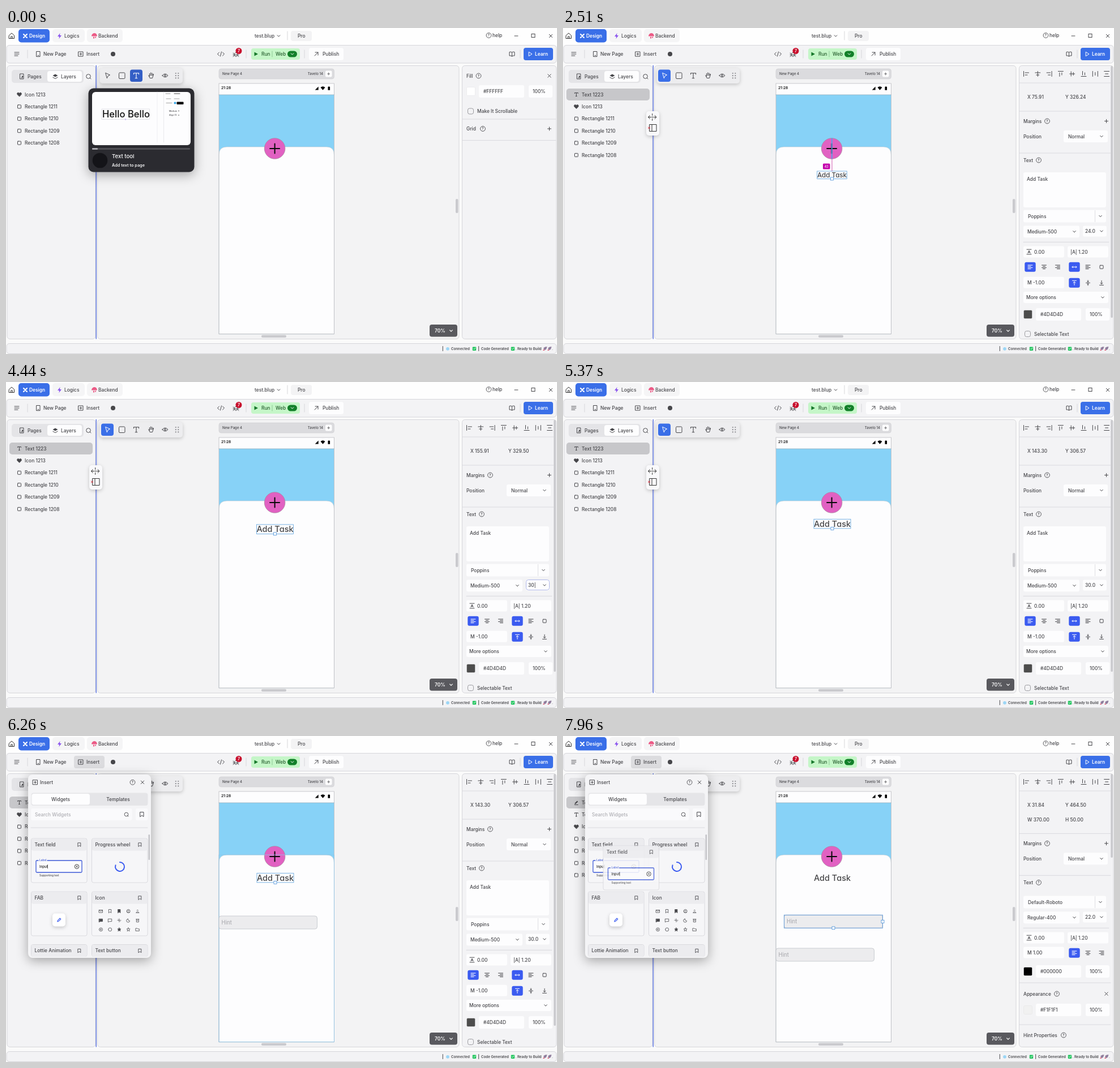
Write an HTML page that moves like this. It is 973 px wide and 576 px high and loops after 8 s.

```html
<!DOCTYPE html>
<html lang="en">
<head>
<meta charset="utf-8">
<title>App builder</title>
<style>
html, body { margin: 0; width: 100%; height: 100%; overflow: hidden; background: #fafafa; }
svg { display: block; width: 973px; height: 576px; }
text { font-family: Inter, "Open Sans", sans-serif; white-space: pre; }
.geo { font-feature-settings: "cv11"; }
.soft { filter: drop-shadow(0 2px 3px #0003); }
.deep { filter: drop-shadow(0 5px 10px #0005); }
</style>
</head>
<body>
<svg id="stage" viewBox="0 0 973 576"></svg>
<script>
const LOOP = 8000, INK = '#47474b', BLUE = '#3a6fe8', VIVID = '#3b5bf0', PANEL = '#f3f3f5', EDGE = '#cfcfd4';

// Drawing helpers: every one returns SVG markup.
const rect = (x, y, w, h, r = 0, fill = '#fdfdfe', stroke = 'none', sw = 1) =>
  `<rect x="${x}" y="${y}" width="${w}" height="${h}" rx="${r}" fill="${fill}" stroke="${stroke}" stroke-width="${sw}"/>`;
const disc = (x, y, r, fill = 'none', stroke = 'none', sw = 1) =>
  `<circle cx="${x}" cy="${y}" r="${r}" fill="${fill}" stroke="${stroke}" stroke-width="${sw}"/>`;
const text = (x, y, str, { s = 8.4, w = 500, c = INK, a = 'start', id = '', cls = '', f = '' } = {}) =>
  `<text x="${x}" y="${y + s * .36}" font-size="${s}" font-weight="${w}" fill="${c}" text-anchor="${a}"` +
  `${id && ` id="${id}"`}${cls && ` class="${cls}"`}${f && ` style="font-family:${f}"`}>${str}</text>`;
const icon = (x, y, d, stroke = INK, sw = 1, fill = 'none') =>
  `<path transform="translate(${x} ${y})" d="${d}" fill="${fill}" stroke="${stroke}" stroke-width="${sw}" stroke-linecap="round" stroke-linejoin="round"/>`;
const solid = (x, y, d, fill = INK) => icon(x, y, d, 'none', 0, fill);
const hline = (x1, x2, y, c = '#d6d6dc') => icon(0, y, `M${x1} 0H${x2}`, c, .9);
const vline = (x, y1, y2, c = '#d6d6da', sw = 1) => icon(x, 0, `M0 ${y1}V${y2}`, c, sw);
const group = (id, body, cls = '') => `<g id="${id}" class="${cls}">${body}</g>`;
const during = (spans, body, cls = '') => `<g data-on="${spans}" class="${cls}">${body}</g>`;

const D = {
  down: 'M-2.3-1.2L0 1.2L2.3-1.2', cross: 'M-2.7-2.7L2.7 2.7M2.7-2.7L-2.7 2.7', plus: 'M-3 0H3M0-3V3',
  box: 'M-2.2-3H2.2Q3-3 3-2.2V2.2Q3 3 2.2 3H-2.2Q-3 3-3 2.2V-2.2Q-3-3-2.2-3Z',
  left: 'M-4-3.3H4M-4-1.1H1M-4 1.1H4M-4 3.3H1', mid: 'M-4-3.3H4M-2-1.1H2M-4 1.1H4M-2 3.3H2',
  right: 'M-4-3.3H4M-1-1.1H4M-4 1.1H4M-1 3.3H4', heart: 'M0 3.3L-3.5 0C-5-3-1.5-4.5 0-2C1.5-4.5 5-3 3.5 0Z',
  tee: 'M-3-2V-3H3V-2M0-3V3M-1 3H1', mark: 'M-2.3-3.2H2.3V3.2L0 1.3L-2.3 3.2Z',
  arrow: 'M-3-4.5L4.5-1L1 .8L-.5 4.5Z', wide: 'M-4 0H4M-2.5-1.5L-4 0L-2.5 1.5M2.5-1.5L4 0L2.5 1.5',
  top: 'M-3.5-4H3.5M0 4V-2M-2 0L0-2L2 0', vmid: 'M-3.5 0H3.5M0-4.5V-1.5M0 4.5V1.5M-1.3-2.6L0-1.5L1.3-2.6M-1.3 2.6L0 1.5L1.3 2.6',
  bottom: 'M-3.5 4H3.5M0-4V2M-2 0L0 2L2 0', doc: 'M-3-4.5H3V4.5H-3ZM-1 2.5H1',
  pencil: 'M-3 3L-2.3 .8L1.5-3L3-1.5L-.8 2.3Z'
};
const help = (x, y) => disc(x, y, 4.4, 'none', INK, .9) + text(x, y, '?', { s: 6, w: 600, a: 'middle' });
const heading = (y, label, helpX) => text(813, y, label) + help(helpX, y);
const field = (x, y, w, h = 20) => rect(x, y - h / 2, w, h, 3);
const check = (y, label) => rect(815.5, y - 5, 10, 10, 3, 'none', '#85858a', .8) + text(832, y, label);
const selected = (x, y, d) => rect(x - 9.7, y - 8.5, 19.4, 17, 3, VIVID) + icon(x, y, d, '#fff', 1);
const knob = (x, y) => rect(x - 2.5, y - 2.5, 5, 5, 0, '#fff', '#4a90d8', .8);

function windowBar() {
  return rect(0, 0, 973, 30, 0, '#fefefe') +
    icon(10, 14, 'M-4.5-1L0-5L4.5-1V4.5H-4.5ZM-1.3 4.5V1H1.3V4.5', '#333') +
    rect(22, 2, 55, 23.5, 5, BLUE) + icon(34, 14, 'M-3-3L3 3M3-3L-3 3', '#fff', 2) + text(41, 13.7, 'Design', { w: 600, c: '#fff' }) +
    rect(82, 2, 57, 23, 5, '#f5f5f6') + solid(94.5, 14, 'M1-5L-3.5 1H-.5L-1 5L3.5-1H.5Z', '#8a54ee') + text(103, 13.7, 'Logics') +
    rect(143, 2, 63, 23, 5, '#f5f5f6') + solid(156, 13.5, 'M-5 1C-5-2-3-3-2-4C2-6 5-2 5 1ZM-2 2H0V5H-2ZM1 2H3V4H1Z', '#ec5a86') + text(163, 13.7, 'Backend') +
    text(439, 13.7, 'test.blup') + icon(481.5, 14, D.down) + vline(497, 6, 21) +
    rect(503, 5, 37, 18, 4, '#f3f3f4') + text(515, 13.7, 'Pro') +
    help(852.5, 13) + text(859, 13, 'help') +
    icon(901, 14, 'M-3 0H3') + rect(928, 10.5, 6, 6, 0, 'none', INK) + icon(962, 14, D.cross);
}

function toolbar() {
  return rect(1, 30.5, 971, 31.5, 5, PANEL, EDGE, .8) +
    icon(19, 46, 'M-4-3H4M-4 0H4M-4 3H2') + vline(38, 39, 53) +
    icon(57, 46, D.doc) + text(66, 46, 'New Page') +
    during('5600-8000', rect(120, 35, 54, 22, 4, '#dcdcdf')) +
    icon(132, 46, 'M-4-4H4V4H-4ZM-2 0H2M0-2V2') + text(142, 46, 'Insert') + disc(189, 46, 4, INK) +
    icon(379.5, 46, 'M-3-3L-6 0L-3 3M3-3L6 0L3 3M1-4L-1 4') +
    icon(406, 46.5, 'M-2.5-1Q0-5 2.5-1V2Q0 6-2.5 2ZM-5-2L-2.5-1M-5 4L-2.5 2M5 4L2.5 2M-5 1H5') +
    disc(411, 40.5, 5.5, '#c8102e') + text(411, 40.5, '7', { s: 7, w: 600, c: '#fff', a: 'middle' }) + vline(424, 39, 53) +
    rect(433, 36, 86, 20, 4, '#c5f6c8') + solid(441.5, 46, 'M-3-3.5L3.5 0L-3 3.5Z', '#16782a') +
    text(451, 46, 'Run', { c: '#245b2c' }) + vline(470, 41, 51, '#8cc895') + text(476, 46, 'Web', { c: '#245b2c' }) +
    rect(497, 40.5, 17, 11, 5.5, '#128029') + icon(505.5, 46, D.down, '#fff') + vline(527, 39, 53) +
    rect(535, 35, 61, 22, 4) + icon(548, 46, 'M-3 3L3-3M-2-3H3V2') + text(559, 46, 'Publish') +
    icon(893.5, 46, 'M0-3Q-2-4.5-4.5-3.5V3Q-2 2.5 0 4Q2 2.5 4.5 3V-3.5Q2-4.5 0-3V4') + vline(908, 39, 53) +
    rect(914, 35, 52, 22, 4, BLUE) + icon(926, 46, 'M-2.5-3.5L3 0L-2.5 3.5Z', '#fff') + text(934, 46, 'Learn', { c: '#fff', w: 600 });
}

const layerIcons = { T: D.tee, I: D.heart, R: D.box };
const layers = names => names.map((n, i) => {
  const y = 117.5 + 21.4 * i, pen = n === 'Text field 1226';
  return (pen ? solid(23.5, y, D.pencil) + icon(23.5, y, 'M-3 4H3')
    : icon(23.5, y, layerIcons[n[0]], INK, 1, n[0] === 'I' ? INK : 'none')) + text(33, y, n);
}).join('');

function leftPanel() {
  const base = ['Icon 1213', 'Rectangle 1211', 'Rectangle 1210', 'Rectangle 1209', 'Rectangle 1208'];
  return rect(2, 66.5, 156, 483, 5, PANEL, EDGE, .8) +
    rect(10, 74, 127, 23, 5, '#e4e4e7') + rect(73, 76, 61, 19, 4) +
    icon(28, 85.5, D.doc) + solid(29, 86, 'M-1-2L2 0L-1 2Z') + text(38, 85.5, 'Pages') +
    solid(87, 85.5, 'M0-4L4.5-1.5L0 1L-4.5-1.5ZM-4.5 1L0 3.5L4.5 1V2L0 4.5L-4.5 2Z') + text(97, 85.5, 'Layers') +
    disc(145.5, 85.5, 3.8, 'none', INK) + icon(145.5, 85.5, 'M2.8 2.8L4.5 4.5') +
    during('1860-8000', rect(6, 107, 147, 21, 5, '#c7c7ca')) +
    during('0-1860', layers(base)) + during('1860-6400', layers(['Text 1223', ...base])) +
    during('6400-8000', layers(['Text field 1226', 'Text 1223', ...base]));
}

function canvas() {
  return rect(161.5, 66.5, 638.5, 483, 5, '#f3f3f4', EDGE, .8) +
    rect(794, 302, 4.5, 25, 2, '#cacace') + rect(451, 542.5, 44, 4.5, 2, '#cacace') +
    vline(159.2, 66.5, 549, '#4a64dc', 1.3) +
    rect(376, 72, 203.5, 18, 4, '#dbdbde', '#cfcfd2', .6) + text(382, 81, 'New Page 4', { s: 6.1 }) +
    text(560, 81, 'Tavelo 14', { s: 6.1, a: 'end' }) + rect(564, 75.5, 11.5, 11, 2) + icon(569.7, 81, 'M-2 0H2M0-2V2', INK, .8) +
    rect(376, 98, 203.5, 442.5, 0, '#fdfdfe') + rect(376, 118, 203.5, 110, 0, '#87d2f7') +
    icon(0, 0, 'M376 540.5V224Q376 210 390 210H566Q579.5 210 579.5 224V540.5Z', '#b4c4cf', .6, '#fdfdfe') +
    rect(376, 98, 203.5, 442.5, 0, 'none', '#bcbcc0', .8) + hline(376, 579.5, 118, '#9ab4c2') +
    text(380, 105.7, '21:28', { s: 6.6, w: 600, c: '#111' }) +
    solid(548.7, 106.5, 'M-3 3L3-3V3Z', '#000') + solid(559.5, 106.5, 'M-4-1.5Q0-5 4-1.5L0 3.3Z', '#000') +
    solid(570.3, 106.5, 'M-1.8-2.5H-.8V-3.3H.8V-2.5H1.8V3.3H-1.8Z', '#000') +
    disc(474.6, 213, 18.3, '#e161c2', '#a08898', .7) + icon(474.6, 213, 'M-8.5 0H8.5M0-8.5V8.5', '#0a0a0a', 2) +
    rect(748, 524, 49, 21.5, 4, '#59595e') + text(757, 535, '70%', { w: 600, c: '#fff' }) + icon(786, 535, D.down, '#fff', 1.2);
}

const hint = id => group(id, rect(0, 0, 173.5, 23, 4, '#ececee', '#b8bcc2', .7) + text(4.5, 11.5, 'Hint', { s: 10, w: 400, c: '#a9a9ae', f: 'Roboto,sans-serif' }));

function pageContent() {
  return during('2380-2700', vline(474.8, 195, 231, '#4aa8e8', 1.6) + vline(475, 231, 253, '#d35ab0') +
      rect(459, 239.5, 12.5, 10, 1.5, '#c400ac') + text(465.2, 244.8, '43', { s: 5.5, c: '#fff', a: 'middle' })) +
    group('title', text(0, 0, '', { c: '#48484a', cls: 'geo', id: 'titleText' }) + '<rect id="caret" width="1" fill="#333"/>' +
      group('titleBox', '<rect id="titleFrame" fill="none" stroke="#5aa0dc" stroke-width=".8"/>' + group('titleKnob', knob(0, 0)))) +
    during('6060-6400', rect(376, 210, 203.5, 330.5, 0, 'none', '#8cc5e8', .8)) +
    hint('hint1') + hint('hint2') +
    group('fieldBox', rect(0, 0, 174, 23, 0, 'none', '#5a94d4', .9) + knob(174, 11.5) + knob(87, 23));
}

function floatingTools() {
  const spot = (x, c) => rect(x - 11, 73.5, 22, 21.5, 4, c);
  const pointer = c => icon(179, 84, D.arrow, c), tee = c => icon(230, 84.3, 'M-4.5-2.5V-4.5H4.5V-2.5M0-4.5V4.5M-1.8 4.5H1.8', c, 1.1);
  const dots = [299.8, 304.3].map(x => [80, 84.2, 88.4].map(y => disc(x, y, 1.1, '#8a8a8e')).join('')).join('');
  return rect(165.5, 71, 146.5, 27, 5, '#ededef').replace('<rect', '<rect class="soft"') +
    during('0-440', spot(230, '#345fc6')) + during('440-1860', spot(230, BLUE)) + during('1860-8000', spot(179, BLUE)) +
    during('0-1860', pointer(INK) + tee('#fff')) + during('1860-8000', pointer('#fff') + tee(INK)) +
    rect(199.5, 79, 10.5, 10.5, 1.5, 'none', INK) +
    icon(256, 84, 'M-4 0L-2 4.5H2.5L4.5-2M-2.5 1V-3.5M-.5 0V-5M1.6 0V-4.5M3.3 0V-3L4.5-2M-4 0L-2.5 1') +
    icon(281, 84, 'M-5 0Q0-6 5 0Q0 6-5 0Z') + disc(281, 84, 1.5, 'none', INK) + dots;
}

const splitHandle = () => during('440-8000',
  rect(147, 147, 23, 43, 5, '#f9f9fb').replace('<rect', '<rect class="soft"') +
  icon(157.7, 157.5, 'M-7 0H-2M-4.5-3L-7 0L-4.5 3M2 0H7M4.5-3L7 0L4.5 3M0-6V-3M0-1V1M0 3V6', '#333') +
  icon(159, 176.5, 'M-6-6H6V6H-6ZM-2-6V6', '#333') + icon(152, 176.5, 'M-1.5-1.5L1.5 1.5M1.5-1.5L-1.5 1.5', '#d02030'));

function tooltip() {
  return during('0-440',
    rect(145.5, 106.5, 187, 148, 9, '#2b2b30').replace('<rect', '<rect class="deep"') +
    rect(152, 113, 174, 94, 6) + rect(169, 143, 84.5, 18.5, 0, 'none', '#c8c8d4', .5) + disc(211, 161.5, 1.3, '#cab8ee') +
    text(170, 152, 'Hello Bello', { s: 16.6, w: 500, c: '#111', cls: 'geo' }) +
    vline(267, 113, 202, '#e0e0e6', .5) + vline(278.5, 113, 202, '#d4d4da', .5) +
    hline(282, 290, 116, '#888') + hline(297, 307, 116, '#333') + hline(283, 291, 125, '#999') + hline(297, 306, 125, '#999') +
    hline(283, 293, 132.5, '#999') + disc(298.5, 132.5, 2, '#38a8e8') + rect(301.5, 130.5, 12, 4.5, 1, '#000') +
    text(288, 146.5, 'Medium', { s: 3.6 }) + text(288, 154, 'Align 12', { s: 3.6 }) + disc(305, 146.5, .8, '#444') + disc(305, 154, .8, '#444') +
    rect(152, 212.3, 173, 2.4, 1.2, '#55555b') + '<rect id="progress" x="152" y="212.3" height="2.4" rx="1.2" fill="#b8b8be"/>' +
    disc(166, 234, 13.3, '#141418') +
    text(187, 227, 'Text tool', { s: 9.6, c: '#fff' }) + text(187, 242, 'Add text to page', { s: 7.3, w: 600, c: '#f2f2f2' }));
}

const colorRow = (y, color, code) => rect(813.5, y - 7.5, 15, 15, 2, color, '#e4e4e6', .6) +
  field(835, y, 80, 22) + text(843, y, code) + field(923, y, 42, 22) + text(930, y, '100%');

function inspectorTop(shift, idX, idY) {
  const glyphs = ['M-4.5-4.5V4.5M-2-2H4.5M-2 2H2', 'M0-4.5V4.5M-4.5-2H4.5M-2.5 2H2.5', 'M4.5-4.5V4.5M2-2H-4.5M2 2H-2',
    'M-4.5-4.5H4.5M-2-2V4.5M2-2V2', 'M-4.5 0H4.5M-2-4V4M2-2.5V2.5', 'M-4.5 4.5H4.5M-2 2V-4.5M2 2V-2', 'M-4.5-4.5V4.5M4.5-4.5V4.5M0-2.5V2.5', 'M-4.5-4.5H4.5M-4.5 4.5H4.5M-2.5 0H2.5'];
  return glyphs.map((d, i) => icon(818 + 20.3 * i, 81, d)).join('') + hline(806, 967, 97) +
    text(820, 122, '', { id: idX }) + text(887, 122, '', { id: idY }) + hline(806, 967, 147 + shift) +
    heading(164.5 + shift, 'Margins', 855) + icon(959.5, 164.5 + shift, D.plus) +
    text(813, 191.5 + shift, 'Position') + field(884, 191.5 + shift, 78, 21) + text(892, 191.5 + shift, 'Normal') + icon(951, 191.5 + shift, D.down) +
    hline(806, 967, 221 + shift) + heading(233.5 + shift, 'Text', 840);
}
const fontBlock = (y, family, weight, size) =>
  field(813, y, 146, 22) + text(821, y, family) + vline(939.5, y - 10, y + 10, '#dedee2') + icon(949, y, D.down) +
  field(813, y + 27.3, 99, 21) + text(820, y + 27.3, weight) + icon(903, y + 27.3, D.down) +
  field(918, y + 26.5, 42, 19) + size + icon(951, y + 26.5, D.down) + hline(813, 964, y + 45.8) +
  field(813, y + 63, 72) + icon(823, y + 63, 'M-4-4.3H4M-4 4.3H4M-2 2.2L0-2.3L2 2.2M-1.2 .8H1.2') + text(832, y + 63, '0.00') +
  field(891, y + 63, 72) + text(896, y + 63, '|A|') + text(910, y + 63, '1.20');

function rightPanel() {
  const fill = text(813, 84.5, 'Fill') + help(834.5, 84.5) + icon(959.5, 84.5, D.cross) + colorRow(112, '#fff', '#FFFFFF') +
    check(147, 'Make It Scrollable') + hline(806, 971, 161) + heading(178, 'Grid', 842) + icon(959.5, 178, D.plus) + hline(806, 971, 198.5);
  const label = inspectorTop(0, 'textX', 'textY') + rect(813, 255, 146, 62, 3) + text(819, 267, '', { id: 'copy' }) +
    fontBlock(332.5, 'Poppins', 'Medium-500', text(922, 359, '', { id: 'size' })) +
    during('3500-4750', rect(918.5, 349.5, 41, 18, 4, 'none', '#a9b2e8', .9)) +
    selected(825, 422.3, D.left) + icon(849.5, 422.3, D.mid) + icon(873.5, 422.3, D.right) +
    selected(903, 422.3, D.wide) + icon(927, 422.3, D.left) + icon(951, 422.3, D.box + 'M-4-4H4V4H-4Z'.slice(0, 0)) +
    field(813, 449.8, 72) + text(820, 449.8, 'M -1.00') + selected(903, 450.3, D.top) + icon(927, 450.3, D.vmid) + icon(951, 450.3, D.bottom) +
    field(813, 476, 150) + text(818, 476, 'More options') + icon(953, 476, D.down) +
    colorRow(506, '#4d4d4d', '#4D4D4D') + check(540.5, 'Selectable Text') + rect(967.3, 67, 3.5, 445, 1.7, '#c9c9cd');
  const input = inspectorTop(25.3, 'fieldX', 'fieldY') + text(820, 147.5, 'W 370.00') + text(887, 147.5, 'H 50.00') +
    fontBlock(293.5, 'Default-Roboto', 'Regular-400', text(922, 320, '22.0')) +
    field(813, 382.5, 72) + text(820, 382.5, 'M 1.00') + selected(903, 383.3, D.left) + icon(927, 383.3, D.mid) + icon(951, 383.3, D.right) +
    colorRow(416, '#000', '#000000') + hline(806, 967, 436) + heading(455.5, 'Appearance', 872) + icon(959.5, 455.5, D.cross) +
    colorRow(484, '#f1f1f1', '#F1F1F1') + hline(806, 967, 510) + heading(528.5, 'Hint Properties', 884) + rect(967.3, 67, 3.5, 148, 1.7, '#c9c9cd');
  return rect(805.5, 66.5, 166.5, 483, 5, PANEL, EDGE, .8) + during('0-720', fill) + during('720-6400', label) + during('6400-8000', input);
}

function statusBar() {
  const tick = x => rect(x - 3.2, 563.5, 6.4, 6.4, 1, '#1fc45c') + icon(x, 566.7, 'M-1.6 0L-.4 1.3L1.8-1.4', '#fff', .9);
  const rocket = x => solid(x, 566.5, 'M3.5-3.5L2 1L-1 3L-3-1L0-3Z', '#8f7d9c') + solid(x, 566.5, 'M-3 1L-1 3L-3.5 3.5Z', '#e0304c');
  const small = { s: 6.2, w: 600 };
  return rect(1, 557.5, 971, 18, 5, PANEL, EDGE, .8) + vline(771.3, 562.5, 570.5, INK) + disc(780, 566.8, 2.9, '#9cd6f6') +
    text(786, 566.8, 'Connected', small) + tick(827) + vline(834.7, 562.5, 570.5, INK) + text(839, 566.8, 'Code Generated', small) +
    tick(895) + text(899.5, 566.8, '. Ready to Build', small) + rocket(952) + rocket(960) + text(964, 566.8, '.', small);
}

const card = (x, y, name, body = '', h = 78) => rect(x, y, 98.5, h, 3, '#f6f6f8', '#d3d3d9', .8) +
  rect(x + .5, y + .5, 97.5, 21, 3, '#ececef') + text(x + 6, y + 10.7, name) + icon(x + 85, y + 11, D.mark, INK, .9) + body;
const fieldCard = () => card(44.5, 181, 'Text field',
  rect(53, 220, 81, 21, 1.5, '#fbfbfd', '#3b58d8', 1.3) + rect(57.5, 218, 15, 4, 0, '#f6f6f8') + text(59, 219.7, 'Label', { s: 4.8, c: '#3b58d8' }) +
  text(59, 230.7, 'Input', { s: 6.1, c: '#222' }) + vline(73.5, 227.5, 234, '#333', .7) + disc(125, 230.7, 3.8, 'none', '#333', .9) +
  icon(125, 230.7, 'M-1.5-1.5L1.5 1.5M1.5-1.5L-1.5 1.5', '#333', .9) + text(59, 246, 'Supporting text', { s: 4.7 }));

function insertPanel() {
  const minis = ['M-3-2H3V2.5H-3ZM-3-2L0 .5L3-2', 'M-2-3H2V3L0 1.3L-2 3Z', 'M-2-3H2V3L0 1.3L-2 3Z', 'M-3 0A3 3 0 1 1 3 0A3 3 0 1 1-3 0M-2 2Q0 0 2 2M-.8-1H.8', 'M-2.5 2.5Q0-1 2.5 2.5ZM-1-1.2L0-2.5L1-1.2',
    'M-3-2.5H3V2H-1L-3 3Z', 'M-3-2.5H3V2H-1L-3 3Z', 'M-1.2 0A1.2 1.2 0 1 1 1.2 0A1.2 1.2 0 1 1-1.2 0M-3 0H-2.5M3 0H2.5M0-3V-2.5M0 3V2.5M-2-2L-1.8-1.8M2 2L1.8 1.8', 'M-1-2.5A3 3 0 1 0 2.5 1Q-1 1-1-2.5Z', 'M-2.5-2H2.5M-2-2V3H2V-2M-1 0H1',
    'M-3 0A3 3 0 1 1 3 0A3 3 0 1 1-3 0M-1 0H1M0-1V1', 'M-3 0A3 3 0 1 1 3 0A3 3 0 1 1-3 0', 'M0-3L1 -1H3L1.4 .5L2 3L0 1.5L-2 3L-1.4 .5L-3-1H-1Z', 'M0-3L1 -1H3L1.4 .5L2 3L0 1.5L-2 3L-1.4 .5L-3-1H-1Z', 'M-3-2H-.5L.5-1H3V2.5H-3Z'];
  const filled = [2, 5, 12];
  const grid = minis.map((d, i) => icon(167.5 + 16.2 * (i % 5), 309.5 + 16.2 * Math.floor(i / 5), d, INK, .8, filled.includes(i) ? INK : 'none')).join('');
  const short = { s: 8.4, c: '#aeaeb3' };
  return during('5650-8000',
    rect(39, 68, 217, 324, 8, '#f4f4f6').replace('<rect', '<rect class="deep"') +
    icon(51.5, 81.8, 'M-4-4H4V4H-4ZM-2 0H2M0-2V2') + text(60, 81.8, 'Insert') + help(223.5, 81.8) + icon(241, 81.8, D.cross) +
    rect(44.5, 100.5, 206, 22.5, 4, '#e5e5e8') + rect(45.5, 102, 102.5, 19.5, 4) +
    text(96.5, 112, 'Widgets', { a: 'middle' }) + text(198, 112, 'Templates', { a: 'middle' }) +
    rect(44.5, 128, 178, 21, 3, '#fafafc') + text(51, 138.5, 'Search Widgets', short) + disc(212.5, 138.5, 3.3, 'none', INK, .9) + icon(212.5, 138.5, 'M2.3 2.3L3.5 3.5') +
    rect(229, 128, 21.5, 21, 3, '#fafafc') + icon(240, 138.5, 'M-3-4H3V4L0 1.8L-3 4Z') + hline(44, 250, 162) +
    fieldCard() + card(151.5, 181, 'Progress wheel', icon(201, 231, 'M0-8A8 8 0 1 1-7.5-2.7', VIVID, 2)) +
    card(44.5, 275, 'FAB', rect(82, 313.5, 23, 23, 5, '#fff').replace('<rect', '<rect class="soft"') + icon(93.7, 325, D.pencil, VIVID, 1.1)) +
    card(151.5, 275, 'Icon', grid) + card(44.5, 368.5, 'Lottie Animation', '', 21) + card(151.5, 368.5, 'Text button', '', 21) +
    rect(251.5, 174, 2.5, 45, 1.2, '#c4c4c8')) + group('ghost', fieldCard());
}

const stage = document.getElementById('stage');
stage.innerHTML = windowBar() + toolbar() + leftPanel() + canvas() + pageContent() + floatingTools() +
  splitHandle() + rightPanel() + statusBar() + tooltip() + insertPanel();

const el = id => document.getElementById(id);
const spans = [...stage.querySelectorAll('[data-on]')].map(node => [node, ...node.dataset.on.split('-').map(Number)]);
const show = (id, on) => { el(id).style.display = on ? '' : 'none'; };
const set = (id, attrs) => { for (const k in attrs) el(id).setAttribute(k, attrs[k]); };
const write = (id, s) => { if (el(id).textContent !== s) el(id).textContent = s; };
const move = (id, x, y) => set(id, { transform: `translate(${x} ${y})` });
const ease = (t, a, b) => { const p = Math.min(1, Math.max(0, (t - a) / (b - a))); return p * p * (3 - 2 * p); };
const at = (t, steps) => steps.filter(([from]) => t >= from).pop()[1];
const KEYS = [840, 980, 1090, 1230, 1390, 1510, 1620, 1730];

function drawTitle(t) {
  const editing = t < 1860, typed = 'Add Task'.slice(0, KEYS.filter(k => t >= k).length);
  const big = t >= 4160, size = big ? 14.5 : 11.6;
  const x = 437.7 + 37.3 * ease(t, 2120, 2470) + .5 * ease(t, 4900, 5250);
  const y = 259.7 + (big ? .4 : 0) - 9.5 * ease(t, 4900, 5250);
  show('title', t >= 720);
  write('titleText', typed.replace(' ', '\u00a0'));
  set('titleText', { x: editing ? 416 : x, y: y + size * .36, 'font-size': size, 'text-anchor': editing ? 'start' : 'middle' });
  show('caret', editing);
  if (editing && t >= 720) set('caret', { x: 416 + el('titleText').getComputedTextLength() + .3, y: 253.5, height: 13 });
  const w = big ? 65 : 52.5, h = big ? 16.5 : 13.5;
  show('titleBox', !editing && t < 6400);
  set('titleFrame', { x: x - w / 2, y: y - h / 2, width: w, height: h });
  move('titleKnob', x, y + h / 2);
  write('copy', typed.trim());
}

function drawFields(t) {
  const p = ease(t, 6650, 7050), x = 376 + 14.5 * p, y = 318 - 1.7 * p;
  show('hint1', t >= 6080);
  move('hint1', x, y);
  show('hint2', t >= 7760);
  move('hint2', 376, 375);
  show('fieldBox', t >= 6400);
  move('fieldBox', x, y);
  const pull = Math.max(ease(t, 5820, 6060) * (1 - ease(t, 6080, 6220)), ease(t, 7380, 7720) * (1 - ease(t, 7760, 8008)));
  show('ghost', (t > 5820 && t < 6220) || t > 7380);
  const near = t > 7760 ? Math.max(pull, 0) : pull;
  move('ghost', t >= 7960 ? 26.5 : 300 * near + (t > 7760 ? 22 : 0), t >= 7960 ? 13 : 140 * near + (t > 7760 ? 11 : 0));
  set('ghost', { opacity: .88 });
}

function draw(t) {
  for (const [node, from, to] of spans) node.style.display = t >= from && t < to ? '' : 'none';
  set('progress', { width: 10 + t * .02 });
  drawTitle(t);
  drawFields(t);
  write('textX', 'X ' + at(t, [[0, '84.80'], [1860, '75.91'], [2700, '155.91'], [5300, '143.30']]));
  write('textY', 'Y ' + at(t, [[0, '326.24'], [2700, '329.50'], [5300, '306.57']]));
  write('fieldX', 'X ' + at(t, [[0, '0.00'], [7080, '31.84']]));
  write('fieldY', 'Y ' + at(t, [[0, '468.10'], [7080, '464.50']]));
  write('size', at(t, [[0, '24.0'], [3500, '24.0|'], [4020, '3|'], [4160, '30|'], [4750, '30.0']]));
}

function frame() {
  draw(performance.now() % LOOP);
  requestAnimationFrame(frame);
}
frame();
</script>
</body>
</html>
```
